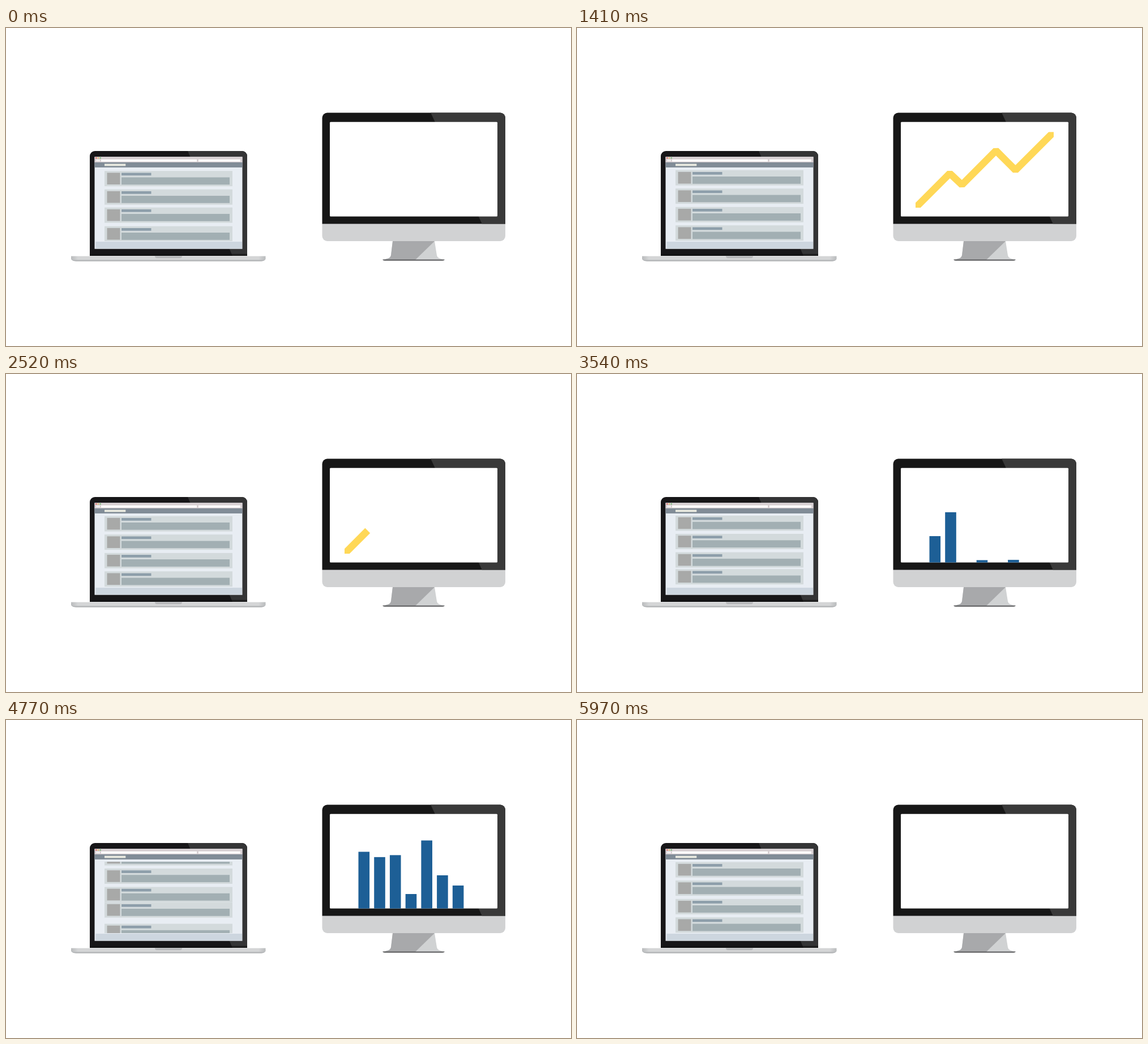
Recreate the animation shown at these times as an HTML page. Size 998x561 px, loop 6.27 s.

```html
<!DOCTYPE html>
<html lang="en">
<head>
<meta charset="utf-8">
<title>Feed and charts</title>
<style>
html, body { margin: 0; width: 100%; height: 100%; overflow: hidden; background: #fff; }
svg { display: block; width: 100vw; height: 100vh; }
</style>
</head>
<body>
<svg viewBox="0 0 998 561">
  <defs>
    <clipPath id="lid"><path d="M148 402V226a9 9 0 0 1 9-9H417a9 9 0 0 1 9 9V402Z"/></clipPath>
    <clipPath id="feedArea"><rect x="174" y="250" width="226" height="126"/></clipPath>
    <clipPath id="panel"><path d="M558.5 345.5V158.500a9 9 0 0 1 9-9H873a9 9 0 0 1 9 9V345.500Z"/></clipPath>
    <clipPath id="lineArea"><rect x="598" y="183.500" width="244" height="133.500"/></clipPath>
    <linearGradient id="base">
      <stop offset="0" stop-color="#b9bbbd"/><stop offset=".035" stop-color="#d4d5d6"/>
      <stop offset=".965" stop-color="#d4d5d6"/><stop offset="1" stop-color="#b9bbbd"/>
    </linearGradient>
    <g id="card">
      <rect x="174" width="226" height="27" fill="#d3dadc"/>
      <rect x="178.500" y="3.200" width="23" height="20.600" fill="#a8a9a8"/>
      <rect x="204" y="3.300" width="52.500" height="4.700" fill="#8d9eaa"/>
      <rect x="204" y="11.300" width="191" height="12.800" fill="#a2afb3"/>
    </g>
  </defs>

  <!-- laptop -->
  <g clip-path="url(#lid)">
    <rect x="148" y="217" width="278" height="186" fill="#171618"/>
    <path d="M321 217H426V402H400Z" fill="#343435"/>
    <path d="M148 398.500H426V402H148Z" fill="#111" opacity=".6"/>
  </g>
  <rect x="156.500" y="227.300" width="261" height="162.400" fill="#e8edf3"/>
  <rect x="156.500" y="227.300" width="261" height="9.700" fill="#d8d0d3"/>
  <g fill="#fff">
    <rect x="168" y="231.800" width="169" height="3.800"/>
    <rect x="340" y="231.800" width="74" height="3.800"/>
    <rect x="159" y="232" width="7" height="3.200" opacity=".7"/>
  </g>
  <circle cx="159.200" cy="229.300" r="1.200" fill="#e0605c"/>
  <circle cx="163" cy="229.300" r="1.200" fill="#e3bd63"/>
  <circle cx="166.700" cy="229.300" r="1.200" fill="#74b875"/>
  <rect x="156.500" y="237" width="261" height="9" fill="#818c97"/>
  <rect x="174" y="239.600" width="37.300" height="3.800" fill="#e9eae0"/>
  <g id="feed" clip-path="url(#feedArea)"></g>
  <rect x="158.500" y="377" width="258.500" height="11.800" fill="#cdd6df"/>
  <path d="M115 402.500H458.500V408Q455 411.500 449 411.500H124Q118 411.500 115 408Z" fill="url(#base)"/>
  <path d="M116 409Q119 411.600 124 411.600H449Q455 411.600 457.500 409Z" fill="#b6b8ba"/>
  <path d="M263 402.500H311Q311 406 307 406H267Q263 406 263 402.500Z" fill="#b6b7b9"/>

  <!-- monitor -->
  <path d="M558.500 345H882V367a9 9 0 0 1-9 9H567.500a9 9 0 0 1-9-9Z" fill="#d1d2d3"/>
  <g clip-path="url(#panel)">
    <rect x="558" y="149" width="325" height="197" fill="#171717"/>
    <path d="M750 149H883V346H841Z" fill="#393939"/>
  </g>
  <rect x="572" y="165.800" width="296" height="166.700" rx="1.500" fill="#fff"/>
  <path d="M683 376H757L761 401Q762 406 768 407L774.500 409H665.500L673 407Q679 406 680 401Z" fill="#d0d2d3"/>
  <path d="M683 376H757L723 409H665.500L673 407Q679 406 680 401Z" fill="#a8a9ab"/>
  <path d="M665 408.500H775Q774 410.500 771 410.500H669Q666 410.500 665 408.500Z" fill="#58595b"/>

  <g clip-path="url(#lineArea)">
    <path id="line" pathLength="1" fill="none" stroke="#ffd857" stroke-width="12.500" stroke-linejoin="bevel"
      d="M596 319L658.500 256.500L680 276.700L740 216.300L774.500 250.700L845 180.500"/>
  </g>
  <g id="bars" fill="#1d5f96"></g>
</svg>
<script>
const LOOP = 6270, PITCH = 32.5, FLOOR = 332.5;
const NS = 'http://www.w3.org/2000/svg';
const $ = id => document.getElementById(id);

function add(parent, tag, attrs) {
  const el = document.createElementNS(NS, tag);
  for (const k in attrs) el.setAttribute(k, attrs[k]);
  return parent.appendChild(el);
}

const clamp = u => Math.min(1, Math.max(0, u));
const smooth = (t, start, len) => {
  const u = clamp((t - start) / len);
  return u * u * (3 - 2 * u);
};

// cubic-bezier(x1, 0, x2, 1) solved by bisection
function bezier(u, x1, x2) {
  u = clamp(u);
  let lo = 0, hi = 1;
  for (let i = 0; i < 24; i++) {
    const s = (lo + hi) / 2, r = 1 - s;
    if (3 * x1 * s * r * r + 3 * x2 * s * s * r + s * s * s < u) lo = s; else hi = s;
  }
  return lo * lo * (3 - 2 * lo);
}

// Each feed update pushes every card one slot down.
const feedStarts = [-62, 1498, 3058, 4618];
const cards = [0, 1, 2, 3, 4].map(() => add($('feed'), 'use', { href: '#card' }));

function drawFeed(t) {
  const start = feedStarts.filter(s => s <= t).pop();
  cards.forEach((card, i) => {
    const shift = i === 3 ? bezier((t - start) / 762, .3, .31)
                          : bezier((t - start) / 650, .3, .15);
    const y = 250.7 + (i - 1 + shift) * PITCH;
    card.setAttribute('transform', `translate(0 ${y.toFixed(2)})`);
  });
}

function drawLine(t) {
  const p = smooth(t, 374, 826) - smooth(t, 1785, 1000);
  const line = $('line');
  line.setAttribute('visibility', p > .001 ? 'visible' : 'hidden');
  line.setAttribute('stroke-dasharray', p > .999 ? 'none' : `${Math.max(p, 0)} 2`);
}

// first height, grow start, second height, change start, change length
const barData = [
  [148.5, 3446, 100, 4430, 255],
  [98.5, 3336, 57, 4700, 255],
  [115, 3650, 87, 4600, 255],
  [25.5, 3476, 83.5, 4790, 255],
  [120, 3765, 120, 4700, 255],
  [58.5, 3497, 109.5, 4790, 500],
  [93.5, 3560, 40.5, 4500, 255]
];
const bars = barData.map((_, i) =>
  add($('bars'), 'rect', { x: 622.5 + i * 27.72, width: 19.6 }));

function drawBars(t) {
  const keep = 1 - smooth(t, 5775, 195);
  barData.forEach(([a, grow, b, change, len], i) => {
    const h = (a * smooth(t, grow, 255) + (b - a) * smooth(t, change, len)) * keep;
    bars[i].setAttribute('y', FLOOR - h);
    bars[i].setAttribute('height', h);
  });
}

const origin = performance.now();
function render() {
  const t = Math.max(0, performance.now() - origin) % LOOP;
  drawFeed(t);
  drawLine(t);
  drawBars(t);
  requestAnimationFrame(render);
}
render();
</script>
</body>
</html>
```
